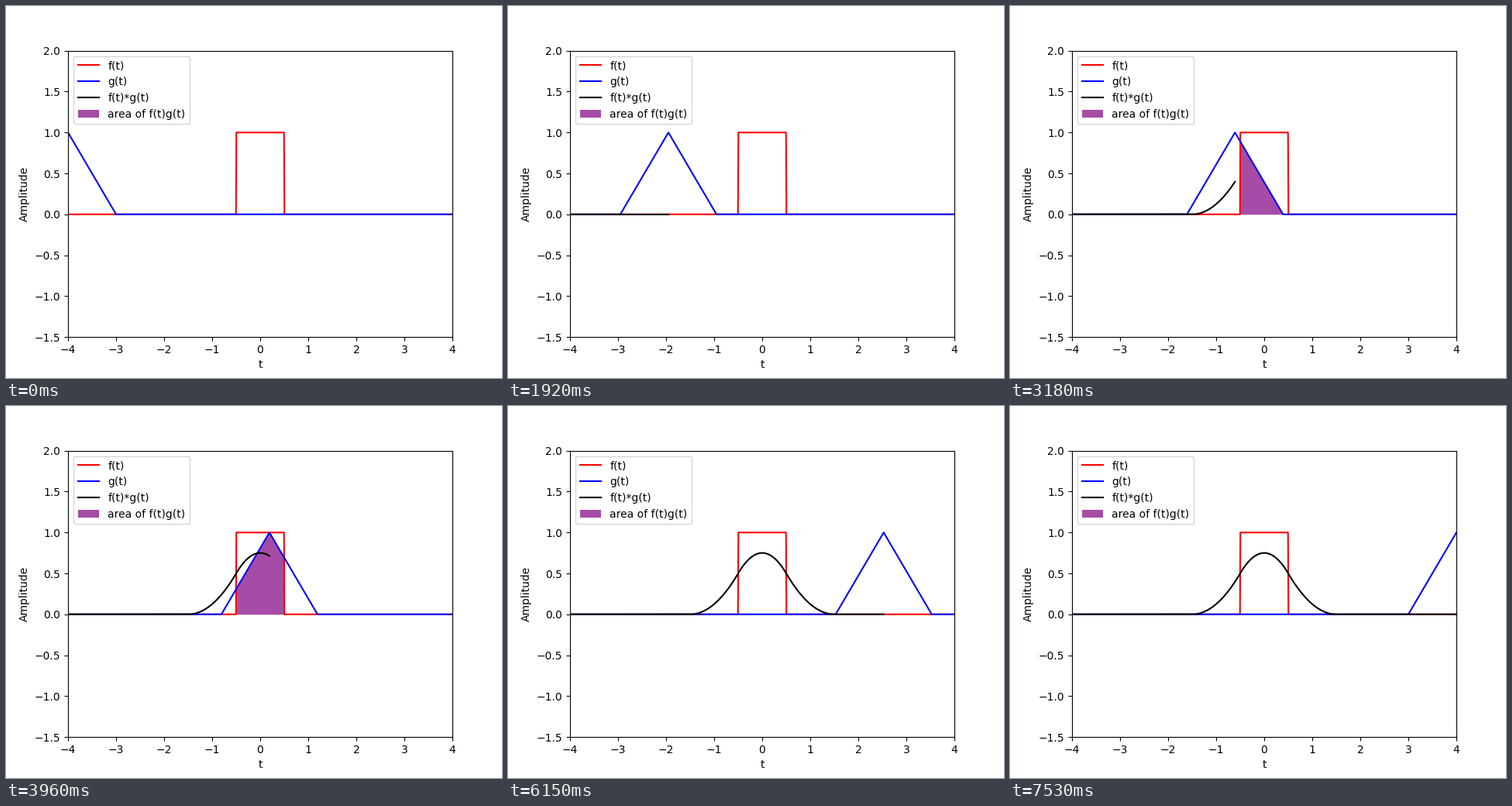
Recreate the animation shown at these times as a matplotlib script. Size 640x480 px, loop 7560 ms.

```python
import numpy as np
import matplotlib.pyplot as plt
from matplotlib.animation import FuncAnimation

FRAMES = 252
STRIDE = 4  # samples the triangle advances per step

t = np.linspace(-4, 4, 1001)


def triangle(x):
    return np.clip(1 - np.abs(x), 0, None)


def triangle_integral(x):
    c = np.clip(x, -1, 1)
    return c - c * np.abs(c) / 2


f = np.where(np.abs(t) < 0.5 + 1e-9, 1.0, 0.0)
conv = triangle_integral(t + 0.5) - triangle_integral(t - 0.5)

plt.rcParams["font.family"] = "DejaVu Sans"
fig, ax = plt.subplots(figsize=(6.4, 4.8), dpi=100)
ax.set(xlim=(-4, 4), ylim=(-1.5, 2), xlabel="t", ylabel="Amplitude")

ax.plot(t, f, color="red", label="f(t)")
g_line, = ax.plot(t, triangle(t - t[0]), color="blue", label="g(t)")
conv_line, = ax.plot([], [], color="black", label="f(t)*g(t)")
area = ax.fill_between(t, 0 * t, color="purple", alpha=0.7, linewidth=0,
                       label="area of f(t)g(t)")
ax.legend(loc="upper left")


def update(n):
    # both halves of the sweep include the centre, so it shows twice
    step = n if n < FRAMES // 2 else n - 1
    k = STRIDE * step
    g = triangle(t - t[k])
    g_line.set_ydata(g)
    conv_line.set_data(t[:k + 1], conv[:k + 1])
    top = np.column_stack([t, f * g])
    area.set_verts([np.vstack([top, [(t[-1], 0), (t[0], 0)]])])
    return g_line, conv_line, area


anim = FuncAnimation(fig, update, frames=FRAMES, interval=30,
                     init_func=lambda: update(0), repeat=True, repeat_delay=0)
plt.show()
```
